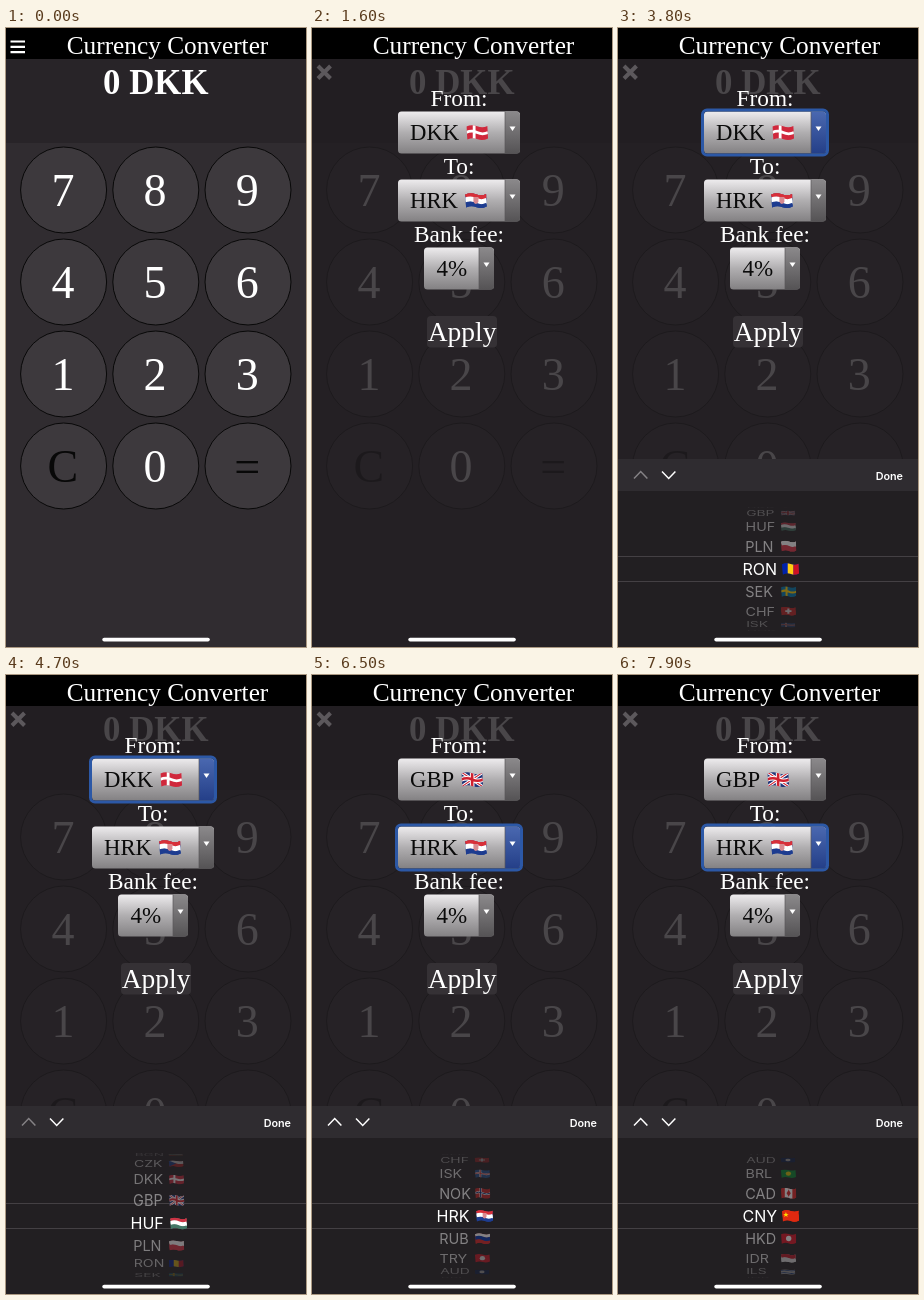
Animation of 300 by 619 pixels, one loop 8 s. Source, as an HTML page:

```html
<!DOCTYPE html>
<html lang="en">
<head>
<meta charset="utf-8">
<title>Currency Converter</title>
<style>
html, body { margin: 0; width: 100%; height: 100%; overflow: hidden; background: #302c30; }
svg { display: block; width: 100%; height: 100%; }
.serif { font-family: "Liberation Serif", "Times New Roman", serif; }
.sans { font-family: Inter, Roboto, sans-serif; }
</style>
</head>
<body>
<svg id="stage" viewBox="0 0 300 619"></svg>
<script>
const LOOP = 8000;
const PANEL_Y = 431, PANEL_H = 188;

// Each flag: layout, colours, then an optional emblem path with its colour.
const FLAGS = {
  EUR: 'd 039 fc0',
  USD: 'h c23 fff c23 fff c23 fff c23|M0 0H10V9H0Z|236',
  JPY: 'd fff c03',
  BGN: 'h fff 0a6 d32',
  CZK: 'h fff d22|M0 0L11 7.5L0 15Z|14a',
  DKK: 'n d0283c fff',
  GBP: 'u 1f3478',
  HUF: 'h c34 fff 476',
  PLN: 'h fff d34',
  RON: 'v 02a fc1 c12',
  SEK: 'n 07a fc0',
  CHF: 'h d22|M9.5 3H12.5V6H15.5V9H12.5V12H9.5V9H6.5V6H9.5Z|fff',
  ISK: 'n 259 fff d22',
  NOK: 'n b22 fff 026',
  HRK: 'h d8303a fff 1d3c90|M8.5 4H13.5V8.5Q13 10.5 11 11Q9 10.5 8.5 8.5Z|d88a90',
  RUB: 'h fff 03a d22',
  TRY: 'd e12 fff',
  AUD: 'd 026 fff',
  BRL: 'd 093 fd0',
  CAD: 'v d22 fff fff d22|M11 3L14 7.5L11 12L8 7.5Z|d22',
  CNY: 'h de2910|M5 2.5L6 5H8.5L6.5 6.5L7.2 9L5 7.5L2.8 9L3.5 6.5L1.5 5H4Z|fd0',
  HKD: 'd d12 fff',
  IDR: 'h d12 fff',
  ILS: 'h fff 04b fff fff 04b fff',
  INR: 'h f93 fff 183'
};
const CODES = Object.keys(FLAGS);

const rect = (x, y, w, h, fill, more = '') =>
  `<rect x="${x}" y="${y}" width="${w}" height="${h}" fill="${fill}" ${more}/>`;
const path = (d, fill, more = '') => `<path d="${d}" fill="${fill}" ${more}/>`;
const line = (d, color, width, more = '') =>
  path(d, 'none', `stroke="${color}" stroke-width="${width}" ${more}`);
const text = (s, x, y, size, more = '') =>
  `<text x="${x}" y="${y}" font-size="${size}" ${more}>${s}</text>`;
const mid = 'text-anchor="middle"';

const wave = y => `M0 ${y}Q5.5 ${y - 2.6} 11 ${y}T22 ${y}`;

// A waving flag in a 22 x 15 box.
function flag(code) {
  const [base, emblem, emblemColor] = FLAGS[code].split('|');
  const [kind, ...names] = base.split(' ');
  const colors = names.map(c => '#' + c);
  const n = colors.length;
  let s = rect(0, 0, 22, 16, kind === 'h' ? colors[n - 1] : colors[0]);
  if (kind === 'h') {
    s += rect(0, 0, 22, 3, colors[0]);
    s += colors.map((c, i) => line(wave((i + .5) * 15 / n), c, 15 / n + .3)).join('');
  }
  if (kind === 'v') s += colors.map((c, i) => rect(i * 22 / n, 0, 22 / n + .1, 16, c)).join('');
  if (kind === 'd') s += `<circle cx="11" cy="7.5" r="3.8" fill="${colors[1]}"/>`;
  if (kind === 'n') {
    const cross = 'M8 0V15' + wave(7.5);
    s += line(cross, colors[1], 2.8);
    if (colors[2]) s += line(cross, colors[2], 1.3);
  }
  if (kind === 'u') {
    const diagonals = 'M0 0L22 15M22 0L0 15', cross = 'M11 0V15' + wave(7.5);
    s += line(diagonals, '#fff', 3) + line(diagonals, '#d0202f', 1.1);
    s += line(cross, '#fff', 4.6) + line(cross, '#d0202f', 2.6);
  }
  if (emblem) s += path(emblem, '#' + emblemColor);
  return `<g clip-path="url(#wave)">${s}</g>`;
}

function calculator() {
  const keys = ['7', '8', '9', '4', '5', '6', '1', '2', '3', 'C', '0', '='];
  return rect(0, 31, 300, 84, '#282428') +
    text('0 DKK', 149.8, 66, 34.8, `${mid} fill="#fff" font-weight="bold"`) +
    keys.map((k, i) => {
      const x = 57.6 + i % 3 * 92.2, y = 162 + Math.floor(i / 3) * 92;
      return `<circle cx="${x}" cy="${y}" r="43" fill="#3d393d" stroke="#080808"/>` +
        text(k, x - .7, y + 15.5, 46, `${mid} fill="${/\d/.test(k) ? '#fff' : '#080808'}"`);
    }).join('');
}

function select(id, x, y, w) {
  const ax = x + w - 15;
  return rect(x, y, w, 42, 'url(#face)', 'rx="3.5"') +
    path(`M${ax} ${y}h11.5q3.5 0 3.5 3.5v35q0 3.5 -3.5 3.5h-11.5z`, 'url(#arrow)', `id="${id}Arrow"`) +
    line(`M${ax} ${y}v42`, '#5a585a', .7) +
    path(`M${ax + 4.5} ${y + 15}h6l-3 4.5z`, '#fff') +
    rect(x - 1.5, y - 1.5, w + 3, 45, 'none', `id="${id}Ring" rx="4.5" stroke="#2c58a6" stroke-width="3"`) +
    `<g id="${id}"></g>`;
}

function form() {
  const label = (s, y) => text(s, 147, y, 23.3, `${mid} fill="#fff"`);
  return rect(0, 31, 300, 588, '#211e21', 'opacity=".82"') +
    line('M6 38L18.5 50.5M18.5 38L6 50.5', '#5c585c', 4) +
    label('From:', 77.8) + label('To:', 146.3) + label('Bank fee:', 214.3) +
    select('from', 86, 83.5, 122) + select('to', 86, 151.5, 122) + select('fee', 112, 219.5, 70) +
    text('4%', 124.5, 248.4, 23, 'fill="#0a0a0a"') +
    rect(115, 288, 70, 31.5, '#353135', 'rx="4"') +
    text('Apply', 150, 313, 27.5, `${mid} fill="#fff"`);
}

function picker() {
  const rows = CODES.map(c => `<g class="row">` +
    text(c, -28, 5.8, 16, 'fill="#fff"') +
    `<g transform="translate(11.5 -6) scale(.78)">${flag(c)}</g></g>`).join('');
  return rect(0, 0, 300, PANEL_H + 10, '#221f22') +
    rect(0, 0, 300, 32, '#2f2c30') +
    line('M16 19.5L22.7 12.5L29.4 19.5', '#fff', 1.5, 'id="prev"') +
    line('M44 12.5L50.7 19.5L57.4 12.5', '#fff', 1.5) +
    text('Done', 285, 20.5, 10.8, 'id="done" text-anchor="end" font-weight="600"') +
    `<g id="wheel">${line('M0 97.5H300M0 122.5H300', '#444044', 1)}${rows}</g>`;
}

const stops = (id, ...list) => `<linearGradient id="${id}" x1="0" y1="0" x2="0" y2="1">` +
  list.map((c, i) => `<stop offset="${i / (list.length - 1)}" stop-color="${c}"/>`).join('') +
  '</linearGradient>';

const $ = id => document.getElementById(id);
$('stage').innerHTML =
  `<defs>${stops('face', '#eeecee', '#b0aeb0', '#838183')}${stops('arrow', '#8b898b', '#555355')}` +
  stops('arrowOn', '#4a68b0', '#243f88') +
  `<clipPath id="wave"><path d="M.3 1.6Q5.5 -1 11 1.2T21.2 1L21.9 13.4Q16.5 16.2 11.5 14.2T1.2 14.6Z"/></clipPath></defs>` +
  rect(0, 0, 300, 619, '#302c30') +
  `<g class="serif">${calculator()}${rect(0, 0, 300, 31, '#000')}` +
  text('Currency Converter', 161.5, 25.7, 25.3, `${mid} fill="#fff"`) +
  line('M4.5 13.5H19M4.5 18.8H19M4.5 24.1H19', '#fff', 2.2, 'id="menu"') +
  `<g id="form">${form()}</g></g>` +
  `<g id="panel" class="sans">${picker()}</g>` +
  rect(96.3, 609.7, 107.5, 3.8, '#fff', 'rx="1.9"');

const rows = [...document.querySelectorAll('.row')];
const shown = {};

const ramp = (t, start, end) => Math.min(1, Math.max(0, (t - start) / (end - start)));
const out = u => 1 - (1 - u) ** 3;
const inOut = u => (1 - Math.cos(Math.PI * u)) / 2;
const attr = (id, name, value) => $(id).setAttribute(name, value);

function setValue(id, code, y) {
  if (shown[id] === code) return;
  shown[id] = code;
  const box = $(id);
  box.innerHTML = text(code, 98, y, 22.7, 'fill="#0a0a0a"');
  const x = 105 + box.firstChild.getComputedTextLength();
  box.innerHTML += `<g transform="translate(${x} ${y - 15})">${flag(code)}</g>`;
}

function setFocus(id, on) {
  attr(id + 'Ring', 'visibility', on ? 'visible' : 'hidden');
  attr(id + 'Arrow', 'fill', on ? 'url(#arrowOn)' : 'url(#arrow)');
}

function turnWheel(pos) {
  rows.forEach((row, i) => {
    const d = i - pos, angle = d * 21.5 * Math.PI / 180;
    const c = Math.cos(angle), active = Math.abs(d) < .5;
    if (Math.abs(d) > 4.15) return row.setAttribute('display', 'none');
    row.removeAttribute('display');
    const sx = active ? 1 : .84 + .07 * c;
    row.setAttribute('transform',
      `translate(152.5 ${110 + 62 * Math.sin(angle)}) scale(${sx} ${Math.max(c, .02)})`);
    row.setAttribute('opacity', active ? 1 : .46 * c + .01);
  });
}

function render(t) {
  const fade = ramp(t, 850, 1600);
  attr('form', 'opacity', fade);
  attr('menu', 'opacity', 1 - fade);

  const closing = t >= 5300 && t < 5950, second = t >= 5950;
  setFocus('from', t >= 2000 && t < 5300);
  setFocus('to', t >= 5900);
  setFocus('fee', false);
  setValue('from', t < 5300 ? 'DKK' : 'GBP', 112);
  setValue('to', 'HRK', 180);

  const open = second ? out(ramp(t, 5950, 6490))
    : closing ? 1 - out(ramp(t, 5390, 5950))
    : out(ramp(t, 2213, 2833));
  attr('panel', 'transform', `translate(0 ${PANEL_Y + (1 - open) * PANEL_H})`);
  attr('panel', 'visibility', open > 0 ? 'visible' : 'hidden');
  attr('wheel', 'display', closing ? 'none' : 'inline');
  attr('prev', 'stroke', second ? '#fff' : '#858285');
  attr('done', 'fill', closing ? '#969396' : '#fff');

  turnWheel(second
    ? 14 + 6 * inOut(ramp(t, 6650, 7850))
    : 5 + 4 * inOut(ramp(t, 2850, 3750)) - 3 * inOut(ramp(t, 4050, 5000)));
}

const start = performance.now();
function tick() {
  render((performance.now() - start) % LOOP);
  requestAnimationFrame(tick);
}
tick();
</script>
</body>
</html>
```
